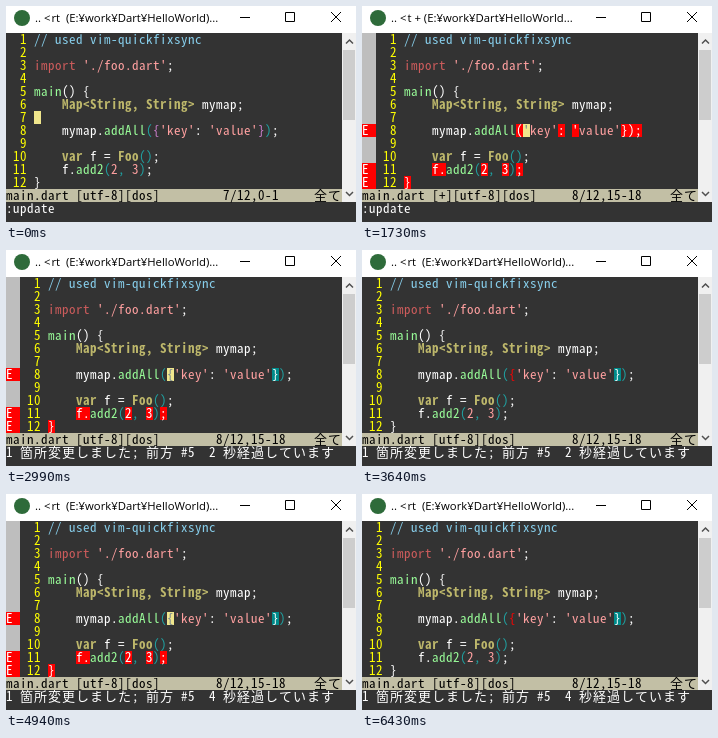
An HTML page with a canvas for the animation above (6.64 s loop, 350 by 216 pixels).

```html
<!DOCTYPE html>
<html lang="ja">
<head>
<meta charset="utf-8">
<title>Editor</title>
<style>
html, body { margin: 0; width: 100%; height: 100%; overflow: hidden; background: #333; }
canvas { display: block; }
</style>
</head>
<body>
<canvas id="stage" width="350" height="216"></canvas>
<script>
const ctx = document.getElementById('stage').getContext('2d');
const LOOP = 6640, CW = 7, CH = 13, TOP = 27;
const MONO = '13px "Noto Sans Mono CJK JP", "Liberation Mono", monospace';
const WIDE = '13px "Noto Sans CJK JP", "Noto Sans CJK", sans-serif';
const TITLE = '11.3px "Open Sans", sans-serif';

const C = {
  bg: '#333333', text: '#ffffff', number: '#ffff00', comment: '#87ceeb',
  pre: '#cd5c5c', str: '#ffa0a0', type: '#bdb76b', func: '#98fb98',
  paren: '#20a0a0', brace: '#d080d0',
  status: '#c2bfa5', cursor: '#f0e68c', under: '#708090',
  match: '#008b8b', error: '#ff0000', sign: '#bebebe'
};

// Each line is a list of [style, text] runs.
const LINES = [
  [['comment', '// used vim-quickfixsync']],
  [],
  [['pre', 'import'], ['str', " './foo.dart'"], ['text', ';']],
  [],
  [['func', 'main'], ['text', '() {']],
  [['type', '    Map<String, String>'], ['text', ' mymap;']],
  [],
  null,
  [],
  [['type', '    var'], ['text', ' f = '], ['type', 'Foo'], ['paren', '()'], ['text', ';']],
  [['text', '    f.'], ['func', 'add2'], ['paren', '('], ['str', '2'], ['paren', ', '],
   ['str', '3'], ['paren', ')'], ['text', ';']],
  [['text', '}']]
];

const callLine = edited => [
  ['text', '    mymap.'], ['func', 'addAll'], ['paren', '('], ['brace', edited ? '' : '{'],
  ['str', "'key'"], ['text', ': '], ['str', "'value'"], ['brace', '}'],
  ['paren', ')'], ['text', ';']
];

// Marked cells: [line, column, length].
const MARKS = [
  [8, 16, 2], [8, 22, 1], [8, 24, 1], [8, 31, 3],
  [11, 4, 2], [11, 11, 1], [11, 14, 1], [11, 16, 1], [12, 0, 1]
];

const HIDDEN = [[440, 650], [2160, 2360], [2780, 2990], [3640, 4070],
  [4710, 4940], [5790, 6000], [6430, LOOP]];

const within = (t, spans) => spans.some(([a, b]) => t >= a && t < b);
const plain = runs => runs.map(run => run[1]).join('');

function box(x, y, w, h, color) {
  ctx.fillStyle = color;
  ctx.fillRect(x, y, w, h);
}

// Writes one character per grid cell; wide characters take two cells.
function put(col, row, text, fg, bg, bold) {
  const y = TOP + row * CH;
  if (bg) box(col * CW, y, text.length * CW, CH, bg);
  ctx.fillStyle = fg;
  for (const ch of text) {
    const wide = ch.charCodeAt(0) > 127;
    ctx.font = wide ? WIDE : (bold ? 'bold ' : '') + MONO;
    ctx.fillText(ch, col * CW, y + 11);
    col += wide ? 2 : 1;
  }
}

function drawTitle(edited) {
  box(0, 0, 350, TOP, '#ffffff');
  ctx.fillStyle = '#2e6b3a';
  ctx.beginPath();
  ctx.arc(16, 12, 8, 0, Math.PI * 2);
  ctx.fill();

  ctx.font = TITLE;
  ctx.fillStyle = '#000000';
  ctx.fillText('.. <', 29, 16);
  ctx.fillText(edited ? 't + (E:¥work¥Dart¥HelloWorld...' : 'rt  (E:¥work¥Dart¥HelloWorld)...', 45.5, 16);

  ctx.strokeStyle = '#000000';
  ctx.lineWidth = 1;
  ctx.beginPath();
  ctx.moveTo(234, 11.5);
  ctx.lineTo(244, 11.5);
  ctx.rect(279.5, 6.5, 9, 9);
  ctx.moveTo(325, 6);
  ctx.lineTo(335, 16);
  ctx.moveTo(335, 6);
  ctx.lineTo(325, 16);
  ctx.stroke();
}

function drawScrollbar() {
  box(336, TOP, 14, 13 * CH, '#f0f0f0');
  box(337, 44, 12, 70, '#cdcdcd');
  ctx.strokeStyle = '#505050';
  ctx.lineWidth = 1.5;
  ctx.beginPath();
  for (const [y, dir] of [[35.5, -1], [188, 1]]) {
    ctx.moveTo(340, y - 2 * dir);
    ctx.lineTo(343.5, y + 1.5 * dir);
    ctx.lineTo(347, y - 2 * dir);
  }
  ctx.stroke();
}

function drawCode(t, edited, signs) {
  const lines = LINES.map(runs => runs || callLine(edited));
  const left = signs ? 6 : 4;
  const cell = (line, col, len, fg, bg) =>
    put(left + col, line - 1, plain(lines[line - 1]).substr(col, len) || ' ', fg, bg);

  if (signs) box(0, TOP, 2 * CW, 12 * CH, C.sign);
  lines.forEach((runs, row) => {
    put(left - 4, row, String(row + 1).padStart(3), C.number);
    let col = left;
    for (const [style, text] of runs) {
      put(col, row, text, C[style], null, style === 'type');
      col += text.length;
    }
  });

  if (signs) {
    for (const line of [8, 11, 12]) put(0, line - 1, 'E ', C.text, C.error);
    for (const [line, col, len] of MARKS) {
      if (line !== 8 || edited) cell(line, col, len, C.text, C.error);
    }
  }

  const moved = t >= 1090, paired = moved && !edited;
  const line = moved ? 8 : 7, col = moved ? 17 : 0;
  if (paired) cell(8, 32, 1, C.text, C.match);
  if (!within(t, HIDDEN)) cell(line, col, 1, C.under, C.cursor);
  else if (paired) cell(line, col, 1, C.error, C.bg);
}

function drawStatus(t, edited) {
  box(0, TOP + 12 * CH, 350, CH, C.status);
  put(0, 12, 'main.dart ' + (edited ? '[+]' : '') + '[utf-8][dos]', '#000000');
  if (t < 1090) put(31, 12, '7/12,0-1', '#000000');
  else put(30, 12, '8/12,15-18', '#000000');
  put(44, 12, '全て', '#000000');
}

function message(t) {
  if (t < 2990) return ':update';
  const [way, sec] = t < 4070 ? ['前方', 2] : t < 4940 ? ['後方', 3] : ['前方', 4];
  return `1 箇所変更しました; ${way} #5  ${sec} 秒経過しています`;
}

function draw() {
  const t = performance.now() % LOOP;
  const edited = within(t, [[1520, 2990], [4070, 4940]]);
  const signs = within(t, [[1730, 3200], [4070, 5140]]);
  box(0, 0, 350, 216, C.bg);
  drawTitle(edited);
  drawCode(t, edited, signs);
  drawStatus(t, edited);
  drawScrollbar();
  put(0, 13, message(t), C.text);
  requestAnimationFrame(draw);
}
draw();
</script>
</body>
</html>
```
